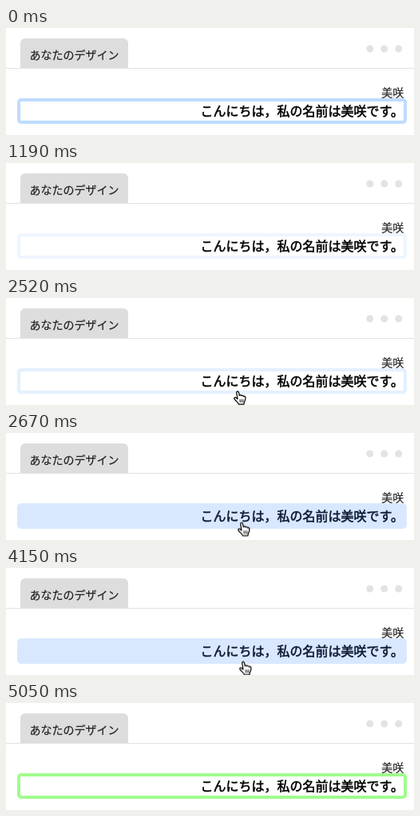
An HTML page for the animation above (6.52 s loop, 511 px wide and 134 px high).

```html
<!DOCTYPE html>
<html lang="ja">
<head>
<meta charset="utf-8">
<title>あなたのデザイン</title>
<style>
  html, body { margin: 0; width: 100%; height: 100%; overflow: hidden; background: #fff; }
  svg { display: block; width: 511px; height: 134px; }
  text {
    font: 14px "Noto Sans CJK JP", "Noto Sans CJK", sans-serif;
    color: #222; fill: currentColor; stroke: currentColor; stroke-width: .2;
  }

  .field, .message, .cursor { animation: 6520ms linear infinite; }
  .field { stroke-width: 4; animation-name: field; }
  .message { font-size: 16px; stroke-width: .55; animation-name: message; }
  .cursor { animation-name: move; animation-timing-function: step-end; }

  /* pulse, hover fill, then confirmed */
  @keyframes field {
    0% { stroke: #bddcff; fill: #fff; }
    9.05% { stroke: #d6e8ff; }
    18.25% { stroke: #eef6ff; }
    25.15%, 28% { stroke: #fff; }
    38.65% { stroke: #e3f0ff; }
    40.93% { stroke: #ddecff; fill: #fff; }
    40.94%, 65.93% { stroke: #d9e8ff; fill: #d9e8ff; }
    65.94%, 100% { stroke: #a1fc8e; fill: #fff; }
  }
  @keyframes message {
    0%, 40.93% { color: #000; }
    40.94%, 65.93% { color: #0d1a33; }
    65.94%, 100% { color: #000; }
  }
  @keyframes move {
    0% { transform: translate(266px, 140px); }
    29.59% { transform: translate(266px, 132px); }
    31.89% { transform: translate(271px, 126px); }
    34.19% { transform: translate(276.5px, 122px); }
    36.49% { transform: translate(282px, 118px); }
    38.64% { transform: translate(285px, 116px); }
    40.94% { transform: translate(290px, 111.5px); }
    43.24% { transform: translate(291px, 111px); }
    45.39% { transform: translate(291.3px, 110.3px); }
    47.69% { transform: translate(292px, 110px); }
    61.49% { transform: translate(292px, 113px); }
    63.64% { transform: translate(292px, 116.5px); }
    65.94% { transform: translate(292px, 118px); }
    68.24% { transform: translate(292px, 125px); }
    70.54% { transform: translate(292px, 129px); }
    72.84% { transform: translate(293px, 130px); }
    75.14% { transform: translate(298px, 133px); }
    77.44%, 100% { transform: translate(298px, 140px); }
  }
</style>
</head>
<body>
<svg viewBox="0 0 511 134">
  <path d="M18 50V19a6 6 0 0 1 6-6H147a6 6 0 0 1 6 6V50z" fill="#ddd"/>
  <path d="M0 50.5H511" stroke="#e2e2e2"/>
  <g fill="#e3e3e3">
    <circle cx="455.8" cy="26" r="4.5"/>
    <circle cx="473.8" cy="26" r="4.5"/>
    <circle cx="491.7" cy="26" r="4.5"/>
  </g>
  <text x="29.5" y="39.3">あなたのデザイン</text>
  <text x="470.3" y="86">美咲</text>
  <rect class="field" x="16" y="90" width="484" height="28" rx="3"/>
  <text class="message" x="243.5" y="109.5">こんにちは，私の名前は美咲です。</text>
  <g class="cursor" stroke="#000" stroke-linejoin="round" stroke-linecap="round">
    <path fill="#fff" stroke-width="1.25" d="M5 10.4L3.8 3C3.4.3 6.1.1 6.6 2.6L7.3 6.2C8 5 9.5 5.2 9.8 6.4C10.6 5.6 11.9 5.9 12.2 7.1C13.4 6.5 14.8 7.2 14.9 8.7C15.1 11 14.5 12.7 13.4 14.2L13 17H6.5C6 15 2.6 12.8 1 10.3C.3 9 1.9 7.9 3.2 8.9z"/>
    <path fill="none" stroke-width=".8" d="M7.9 11.2L8.2 14.4M9.9 11.1L10 14.4M11.9 11L11.8 14.3"/>
  </g>
</svg>
</body>
</html>
```
